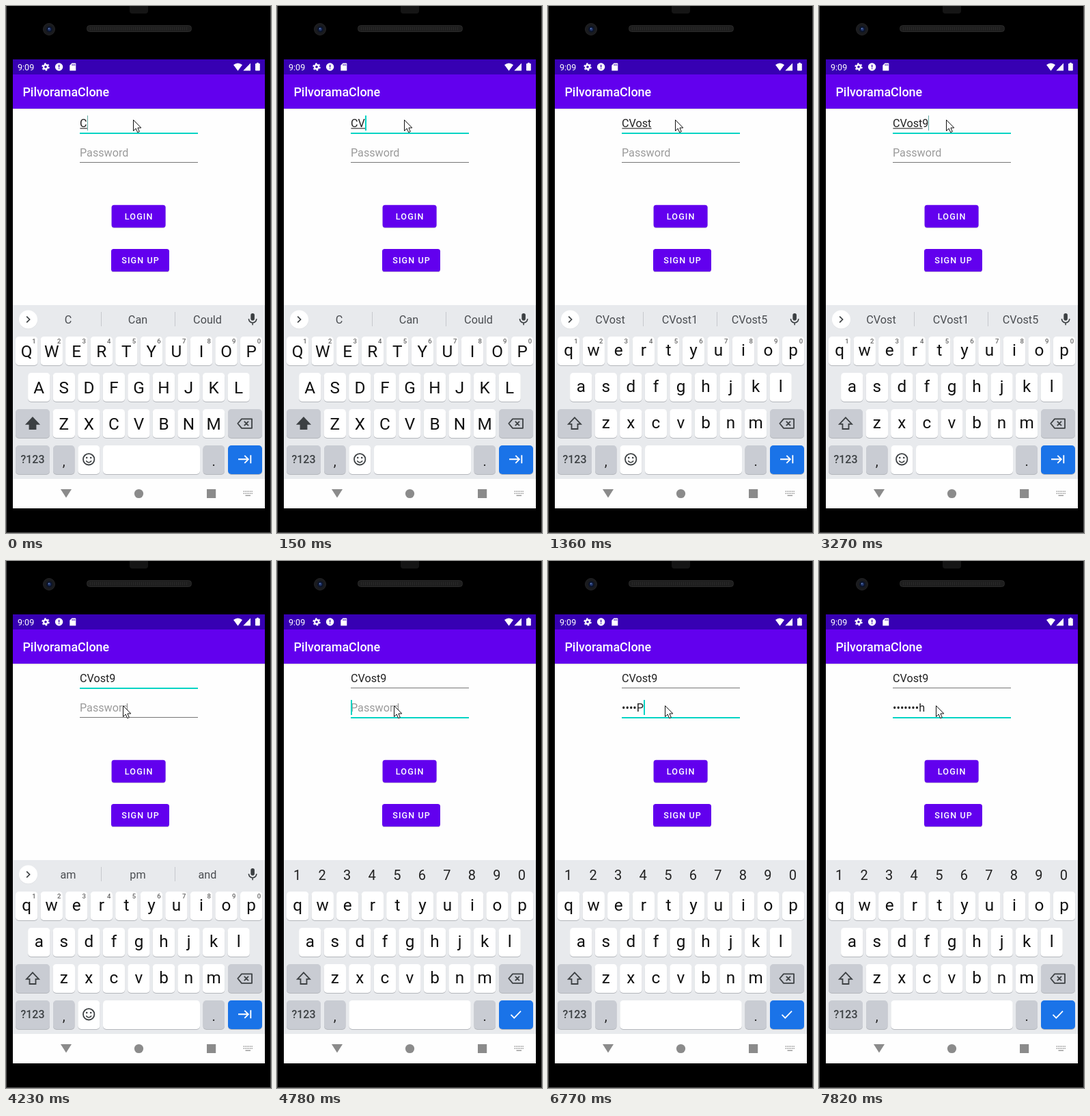
Write an HTML page that moves like this. It is 388x770 px and loops after 8000 ms.

```html
<!DOCTYPE html>
<html lang="en">
<head>
<meta charset="utf-8">
<title>Login form</title>
<style>
  html, body { margin: 0; width: 100%; height: 100%; overflow: hidden; background: #000; }
  svg { display: block; width: 388px; height: 770px; font-family: Roboto, "Noto Sans", sans-serif; }
  text { white-space: pre; }
</style>
</head>
<body>
<svg id="stage" viewBox="0 0 388 770"></svg>
<script>
const LOOP = 8000;
const INK = '#3c4043', TEAL = '#03d4c4', PURPLE = '#6200ee', GREY_KEY = '#c9ccd3';
const FIELD_X = 108, FIELD_SIZE = 16.16, PITCH = 36.54, ROW_PITCH = 53;
const ROWS = ['qwertyuiop', 'asdfghjkl', 'zxcvbnm'];
const stage = document.getElementById('stage');

// Each step changes part of the state from its time on.
const steps = [
  [0, { user: 'C', marked: 1, words: ['C', 'Can', 'Could'], caps: true, caret: true,
        focus: 'user', pass: '', secure: false, mouse: [186, 166] }],
  [150, { user: 'CV', marked: 2 }],
  [280, { user: 'CVo', marked: 3, words: ['CV', 'CVs', 'CVC'], caps: false }],
  [550, { user: 'CVost', marked: 4, words: ['CVo', 'CVost1', 'CVost6'] }],
  [690, { words: ['CVos', 'CVost1', 'CVost6'] }],
  [830, { words: ['CVost', 'CVost1', 'CVost5'], marked: 5 }],
  [1360, { caret: false }],
  [1780, { caret: true }],
  [2280, { caret: false }],
  [2840, { caret: true }],
  [3270, { user: 'CVost9' }],
  [3550, { marked: 0, words: ['am', 'pm', 'and'] }],
  [4080, { caret: false, mouse: [175, 209] }],
  [4230, { mouse: [171, 211] }],
  [4530, { focus: 'pass', caret: 'user' }],
  [4780, { secure: true, caret: true }],
  [5210, { caret: false }],
  [5460, { pass: '1', caret: true }],
  [5850, { pass: '12' }],
  [6100, { pass: '123' }],
  [6250, { pass: '1234' }],
  [6770, { pass: '1234P' }],
  [7020, { pass: '1234Pu' }],
  [7140, { pass: '1234Pus' }],
  [7260, { pass: '1234Push' }],
  [7820, { caret: false }]
];

const rect = (x, y, w, h, fill, more = '') =>
  `<rect x="${x}" y="${y}" width="${w}" height="${h}" fill="${fill}" ${more}/>`;
const circle = (x, y, r, fill, more = '') =>
  `<circle cx="${x}" cy="${y}" r="${r}" fill="${fill}" ${more}/>`;
const line = (d, color, width = 2, more = '') =>
  `<path d="${d}" fill="none" stroke="${color}" stroke-width="${width}" ${more}/>`;
const shape = (d, fill) => `<path d="${d}" fill="${fill}"/>`;
const text = (x, y, s, size, fill, more = '') =>
  `<text x="${x}" y="${y}" font-size="${size}" fill="${fill}" ${more}>${s}</text>`;
const middle = (x, y, s, size, fill, more = '') =>
  text(x, y, s, size, fill, 'text-anchor="middle" ' + more);

function textWidth(s) {
  if (!s) return 0;
  const probe = document.createElementNS('http://www.w3.org/2000/svg', 'text');
  probe.setAttribute('font-size', FIELD_SIZE);
  probe.textContent = s;
  stage.append(probe);
  const width = probe.getComputedTextLength();
  probe.remove();
  return width;
}

function phone() {
  return rect(0, 0, 388, 770, '#000') +
    line('M.5 -5V769.5H387.5V-5', '#555', 1) +
    rect(181, -8, 27, 19, '#151515', 'rx="4"') +
    rect(118.5, 28.5, 153, 9, '#1e1e1e', 'rx="4" stroke="#2a2a2a"') +
    line('M123 33H267', '#292929', 5, 'stroke-dasharray="1 2"') +
    circle(63, 34, 8.5, '#1a1b1e', 'stroke="#242426"') +
    circle(63.5, 34, 4.6, '#0c1428') + circle(63.5, 34, 2.4, '#20356a') +
    circle(62.8, 33, .9, '#6a84bc') +
    rect(10, 78, 369, 656, '#fefefe');
}

function bars() {
  const w = '#fff';
  return rect(10, 78, 369, 22, '#3700b3') + rect(10, 100, 369, 50, PURPLE) +
    rect(10, 150, 369, 1, '#000', 'opacity=".1"') + rect(10, 151, 369, 1, '#000', 'opacity=".04"') +
    text(17, 93.7, '9:09', 12.57, w) +
    circle(58, 89, 3, 'none', `stroke="${w}" stroke-width="2.4"`) +
    circle(58, 89, 4.9, 'none', `stroke="${w}" stroke-width="1.6" stroke-dasharray="2.6 2.53"`) +
    circle(77.6, 89, 5.7, w) + rect(76.9, 85.8, 1.4, 3.9, '#3700b3') + rect(76.9, 90.8, 1.4, 1.4, '#3700b3') +
    shape('M96.5 83.5H101.3Q102.3 83.5 102.3 84.5V94.5H93.3V86.7Z', w) +
    line('M97 85V87.2M98.9 85V87.2M100.8 85V87.2', '#3700b3', .9) +
    shape('M333 86Q339.5 81 346 86L339.5 94.7Z', w) + shape('M358 83.5V94.5H347.3Z', w) +
    rect(365, 84, 6.8, 10.6, w, 'rx=".8"') + rect(367, 82.8, 2.8, 2, w) +
    text(24.4, 131.8, 'PilvoramaClone', 17.96, w, 'font-weight="500"');
}

function button(x, y, w, label) {
  return rect(x, y + 1, w, 33, '#000', 'rx="3.6" opacity=".15"') +
    rect(x, y, w, 33, PURPLE, 'rx="3.6"') +
    middle(x + .6 + w / 2, y + 21, label, 12.57, '#fff', 'font-weight="500" letter-spacing="1.12"');
}

function caretAt(x, y, thin) {
  return rect(Math.round(x), y, thin ? 1 : 2, 22, thin ? '#62aaa4' : TEAL);
}

function underline(y, active) {
  return active ? rect(FIELD_X, y, 173, 2, TEAL) : rect(FIELD_X, y, 173, 1, '#777');
}

function fields(s) {
  const shown = s.pass && '•'.repeat(s.pass.length - 1) + s.pass.slice(-1);
  const marked = s.secure ? 0 : textWidth(s.user.slice(0, s.marked));
  const inUser = s.caret === 'user' || s.caret && s.focus === 'user';
  let out = text(FIELD_X, 177, s.user, FIELD_SIZE, '#212121') +
    rect(FIELD_X + .4, 178.3, marked, marked ? 1.1 : 0, '#212121') +
    underline(185, s.focus === 'user') +
    text(FIELD_X, 220, shown || 'Password', FIELD_SIZE, shown ? '#212121' : '#9b9b9b') +
    underline(228, s.focus === 'pass');
  if (inUser) out += caretAt(FIELD_X + textWidth(s.user), 160, s.user.length % 5 === 1);
  else if (s.caret) out += caretAt(FIELD_X + textWidth(shown), 203);
  return out;
}

function key(x, row, w, fill = '#fff') {
  const y = 483 + row * ROW_PITCH;
  return rect(x, y + 1, w, 42, '#b4b7bc', 'rx="5"') + rect(x, y, w, 42, fill, 'rx="5"');
}

function letters(caps) {
  return ROWS.map((row, r) => [...row].map((c, i) => {
    const x = [30.2, 48.3, 84.8][r] + i * PITCH;
    const y = (caps ? 513 : 511) + r * ROW_PITCH;
    return key(x - 16.2, r, 32.4) + middle(x, y, caps ? c.toUpperCase() : c, 24.3, '#111');
  }).join('')).join('');
}

function strip(s) {
  const digits = [...'1234567890'];
  if (s.secure)
    return digits.map((d, i) => middle(29.6 + i * PITCH, 465.5, d, 20, '#222')).join('');
  return circle(32.5, 458.5, 13.6, '#d4d6da') + circle(32.5, 458, 13.6, '#fff') +
    line('M30.2 453.6L34.6 458L30.2 462.4', INK, 1.7) +
    rect(139, 447, 1, 21, '#c6c9cd') + rect(247, 447, 1, 21, '#c6c9cd') +
    s.words.map((word, i) => middle(91 + i * 102, 464, word, 16.2, '#4a4d51')).join('') +
    rect(358.3, 449, 5.6, 10.5, INK, 'rx="2.8"') +
    line('M355.4 457a5.7 5.8 0 0 0 11.4 0M361.1 463V466.3', INK, 1.6) +
    digits.map((d, i) => middle(41 + i * 36.6, 493.3, d, 9.5, '#666', 'font-weight="500"')).join('');
}

function keyboard(s) {
  const arrow = 'M39 601.3L48 610.8H43.5V618H34.5V610.8H30Z';
  let out = rect(10, 437, 369, 254, '#e8eaed') + letters(s.caps) + strip(s) +
    key(14, 2, 50, GREY_KEY) + key(325, 2, 50, GREY_KEY) +
    (s.caps ? shape(arrow, INK) : '') + line(arrow, INK, 1.8) +
    line('M339.3 610L345 603.4H360V616.8H345ZM348.8 606.9L355 613.1M355 606.9L348.8 613.1',
      INK, 1.8, 'stroke-linejoin="round"') +
    key(14, 3, 50, GREY_KEY) + middle(39, 668, '?123', 16, INK, 'font-weight="500"') +
    key(69, 3, 31.5, GREY_KEY) + middle(84.8, 672, ',', 20, '#222') +
    key(288.5, 3, 31.5, GREY_KEY) + middle(304.2, 672, '.', 20, '#222') +
    key(325, 3, 50, '#1a73e8');
  if (s.secure)
    return out + key(105.3, 3, 178.5) + line('M342.5 662.8L347.3 667.6L357 657.6', '#fff', 1.8);
  return out + key(105.3, 3, 32) + key(142, 3, 142) +
    circle(121.2, 662.3, 8.2, 'none', `stroke="${INK}" stroke-width="1.8"`) +
    circle(118.2, 660, 1.3, INK) + circle(124.2, 660, 1.3, INK) +
    line('M117.2 664.6Q121.2 669.4 125.2 664.6', INK, 1.6) +
    line('M340 662.3H354M349.3 656.8L354.8 662.3L349.3 667.8M358.3 656.3V668.3', '#fff', 1.9);
}

function navigation() {
  const g = '#8b8b8b';
  return shape('M80 706H96L88 718.5Z', g) + circle(194.5, 712.5, 6.6, g) +
    rect(294, 706, 13.2, 13, g) +
    line('M347.5 709.3H361M347.5 712.2H361', '#999', 1.4, 'stroke-dasharray="1.4 1"') +
    line('M350.5 715.3H358', '#999', 1.4);
}

function pointer([x, y]) {
  return `<path transform="translate(${x + .5} ${y + .5})" fill="#fff" stroke="#111"
    d="M0 0V16L3.7 12.5L6.2 18.2L8.8 17L6.4 11.5H11.3Z"/>`;
}

function draw(s) {
  stage.innerHTML = phone() + bars() + fields(s) +
    button(154.6, 290.7, 79, 'LOGIN') + button(154, 355, 85, 'SIGN UP') +
    keyboard(s) + navigation() + pointer(s.mouse);
}

let drawn = 0;
function tick() {
  const t = performance.now() % LOOP;
  const past = steps.filter(([start]) => start <= t);
  if (past.length !== drawn) {
    drawn = past.length;
    draw(Object.assign({}, ...past.map(step => step[1])));
  }
  requestAnimationFrame(tick);
}
tick();
</script>
</body>
</html>
```
